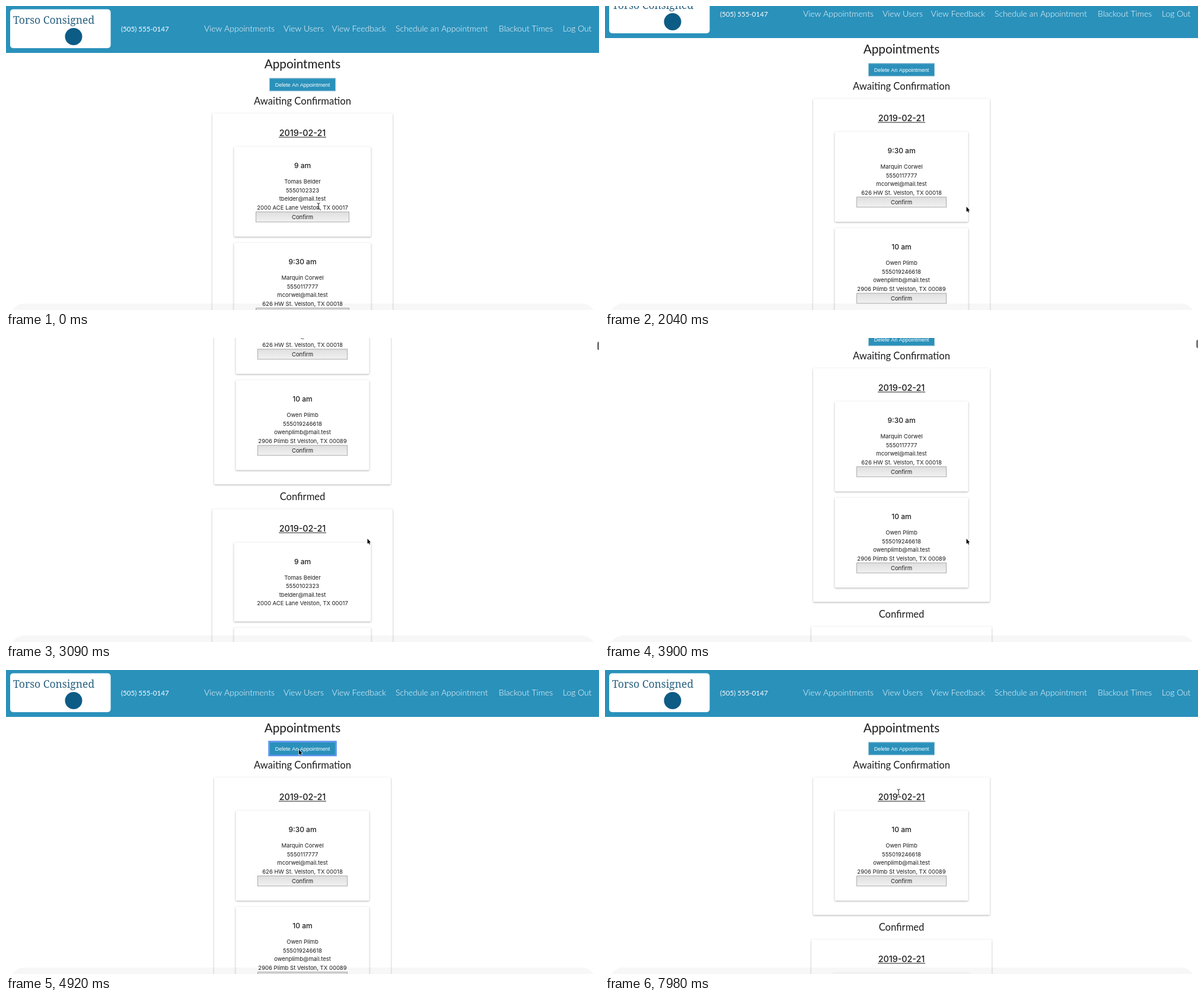
Animation, 1000 px wide and 512 px high, one loop 8 s. Source, as an HTML page with a canvas:

```html
<!DOCTYPE html>
<html lang="en">
<head>
<meta charset="utf-8">
<title>Appointments</title>
<style>
  html, body { margin: 0; width: 100%; height: 100%; overflow: hidden; background: #fff; }
  canvas { display: block; }
</style>
</head>
<body>
<canvas id="stage" width="1000" height="512"></canvas>
<script>
const ctx = document.getElementById('stage').getContext('2d');
const LOOP = 8000, STEP = 30, MID = 500;
const BLUE = '#2a91bb', INK = '#1c1c1c';
const UI = 'Inter, sans-serif', HEAD = 'Lato, sans-serif';

const WIDE = { button: 79, card: 115.5, panel: 152 };
const NARROW = { button: 76, card: 112.5, panel: 149 };

const clients = [
  ['9 am', 'Tomas Belder', '5550102323', 'tbelder@mail.test', '2000 ACE Lane Velston, TX 00017'],
  ['9:30 am', 'Marquin Corwel', '5550117777', 'mcorwel@mail.test', '626 HW St. Velston, TX 00018'],
  ['10 am', 'Owen Plimb', '555019246618', 'owenplimb@mail.test', '2906 Plimb St Velston, TX 00089']
];

const nav = [
  ['View Appointments', 334], ['View Users', 468], ['View Feedback', 549.5],
  ['Schedule an Appointment', 657], ['Blackout Times', 831], ['Log Out', 939]
];

// Keyframes: [time, ...values]
const scrollKeys = [
  [0, 0], [30, 8], [150, 95], [300, 215], [390, 230], [480, 200], [630, 75], [720, 14], [780, 0],
  [2010, 0], [2040, 25], [2160, 92], [2280, 158], [2400, 213], [2520, 257], [2670, 292],
  [2820, 313], [2970, 324], [3090, 328],
  [3450, 328], [3540, 303], [3720, 217], [3900, 130], [4050, 64], [4170, 24], [4260, 5], [4320, 0]
];
const cursorKeys = [
  [0, 527, 337], [1200, 527, 337], [1410, 513, 352], [1680, 513, 352], [1950, 609.5, 338],
  [4290, 609.5, 338], [4560, 560, 230], [4830, 494, 134], [5280, 494, 134],
  [5640, 525, 270], [6090, 548, 430], [6360, 510, 478], [6660, 475, 465],
  [7530, 475, 465], [7740, 523, 345], [7980, 495, 206]
];
const barKeys = [
  [0, 0], [30, 0], [60, 1], [840, 1], [1020, 0], [2040, 0], [2070, 1], [4500, 1], [4680, 0]
];

function sample(keys, t, ease = k => k) {
  const i = keys.findIndex(key => key[0] > t);
  if (i < 0) return keys[keys.length - 1].slice(1);
  const a = keys[i - 1], b = keys[i];
  const k = ease((t - a[0]) / (b[0] - a[0]));
  return a.slice(1).map((v, j) => v + (b[j + 1] - v) * k);
}

function text(str, x, y, font, color = INK, align = 'center') {
  ctx.font = font;
  ctx.fillStyle = color;
  ctx.textAlign = align;
  ctx.fillText(str, x, y);
}

function roundBox(x, y, w, h, r, fill) {
  ctx.beginPath();
  ctx.roundRect(x, y, w, h, r);
  ctx.fillStyle = fill;
  ctx.fill();
}

function paper(half, y, h) {
  ctx.save();
  ctx.shadowColor = 'rgba(0,0,0,.32)';
  ctx.shadowBlur = 3;
  ctx.shadowOffsetY = 1;
  roundBox(MID - half, y, half * 2, h, 1.5, '#fff');
  ctx.restore();
}

function confirmButton(half, y, pressed) {
  const shade = ctx.createLinearGradient(0, y, 0, y + 17);
  shade.addColorStop(0, pressed ? '#c6c6c6' : '#dfdfdf');
  shade.addColorStop(1, pressed ? '#d8d8d8' : '#f1f1f1');
  ctx.fillStyle = shade;
  ctx.fillRect(MID - half, y, half * 2, 17);
  ctx.strokeStyle = '#ababab';
  ctx.lineWidth = 1;
  ctx.strokeRect(MID - half + .5, y, half * 2 - 1, 17);
  text('Confirm', MID, y + 12.3, `9.5px ${UI}`);
}

function card(client, y, size, hasButton, pressed) {
  paper(size.card, y, hasButton ? 151.5 : 133);
  if (!client) return;
  const [time, ...lines] = client;
  text(time, MID, y + 36.3, `500 12px ${UI}`);
  lines.forEach((line, i) => text(line, MID, y + 62.3 + i * 14.5, `9.5px ${UI}`));
  if (hasButton) confirmButton(size.button, y + 109.8, pressed);
}

function panel(y, h, size) {
  paper(size.panel, y, h);
  text('2019-02-21', MID, y + 38, `500 14.3px ${UI}`);
  ctx.fillRect(MID - 40, y + 39.5, 80, 1);
}

function header() {
  ctx.fillStyle = BLUE;
  ctx.fillRect(0, 0, 1000, 79);
  roundBox(7, 5.5, 169.5, 65.5, 5, '#fff');
  text('Torso Consigned', 12, 30, '17.5px "Noto Serif", serif', '#27607f', 'left');
  ctx.beginPath();
  ctx.arc(114, 51.5, 14.5, 0, Math.PI * 2);
  ctx.fillStyle = '#0d5c85';
  ctx.fill();
  text('(505) 555-0147', 194, 42.5, `11.6px ${HEAD}`, '#fff', 'left');
  nav.forEach(([label, x]) => text(label, x, 43, `300 14px ${HEAD}`, '#fff', 'left'));
}

function deleteButton(focused) {
  ctx.fillStyle = BLUE;
  ctx.fillRect(444.5, 121.5, 111, 21.5);
  ctx.strokeStyle = focused ? '#5a91ee' : '#8fbccf';
  ctx.lineWidth = focused ? 2.5 : 1;
  if (focused) ctx.strokeRect(443.5, 120.5, 113, 23.5);
  else ctx.strokeRect(444.5, 122, 111, 21);
  text('Delete An Appointment', MID, 135.5, '9px "Liberation Sans", Arial, sans-serif', '#fff');
}

function page(t) {
  const waiting = clients.slice(t < 1650 ? 0 : t < 7230 ? 1 : 2);
  const size = t < 1650 ? WIDE : NARROW;
  header();
  text('Appointments', MID, 105, `20.7px ${HEAD}`);
  deleteButton(t >= 4890 && t < 7020);
  text('Awaiting Confirmation', MID, 165.7, `16.6px ${HEAD}`);

  const top = 181, height = 69.5 + waiting.length * 162;
  panel(top, height, size);
  waiting.forEach((client, i) => {
    const pressed = i === 0 && t >= 1500 && t < 1590;
    card(client, top + 56 + i * 162, size, true, pressed);
  });

  const bottom = top + height, confirmed = bottom + 41.5;
  text('Confirmed', MID, bottom + 26, `16.6px ${HEAD}`);
  panel(confirmed, 800, WIDE);
  card(t < 1650 ? null : clients[0], confirmed + 56.5, WIDE, false);
  card(null, confirmed + 200, WIDE, false);
}

function arrow(x, y) {
  ctx.beginPath();
  [[0, 0], [0, 8.6], [1.9, 6.9], [3.2, 9.8], [4.5, 9.2], [3.2, 6.4], [5.6, 6.2]]
    .forEach(([dx, dy]) => ctx.lineTo(x + dx, y + dy));
  ctx.closePath();
  ctx.lineWidth = 1.2;
  ctx.strokeStyle = '#fff';
  ctx.stroke();
  ctx.fillStyle = '#000';
  ctx.fill();
}

function beam(x, y) {
  ctx.beginPath();
  for (const s of [-1, 1]) {
    ctx.moveTo(x - 2.5, y + s * 5);
    ctx.quadraticCurveTo(x, y + s * 5, x, y + s * 3.5);
    ctx.quadraticCurveTo(x, y + s * 5, x + 2.5, y + s * 5);
  }
  ctx.moveTo(x, y - 4);
  ctx.lineTo(x, y + 4);
  ctx.lineWidth = 1;
  ctx.strokeStyle = '#222';
  ctx.stroke();
}

function draw(t) {
  const [scroll] = sample(scrollKeys, t);
  const [x, y] = sample(cursorKeys, t, k => k * k * (3 - 2 * k));
  const [bar] = sample(barKeys, t);

  ctx.fillStyle = '#fff';
  ctx.fillRect(0, 0, 1000, 512);
  ctx.save();
  ctx.translate(0, -Math.round(scroll));
  page(t);
  ctx.restore();

  roundBox(8, 501, 986, 60, 22, 'rgba(0,0,0,.03)');
  if (bar > 0) roundBox(997, 1 + scroll * .016, 6, 14, 3, `rgba(85,85,85,${bar * .8})`);
  (t < 1350 || t >= 7860 ? beam : arrow)(x, y);
}

function tick() {
  const t = performance.now() % LOOP;
  draw(Math.floor(t / STEP) * STEP);
  requestAnimationFrame(tick);
}
tick();
</script>
</body>
</html>
```
